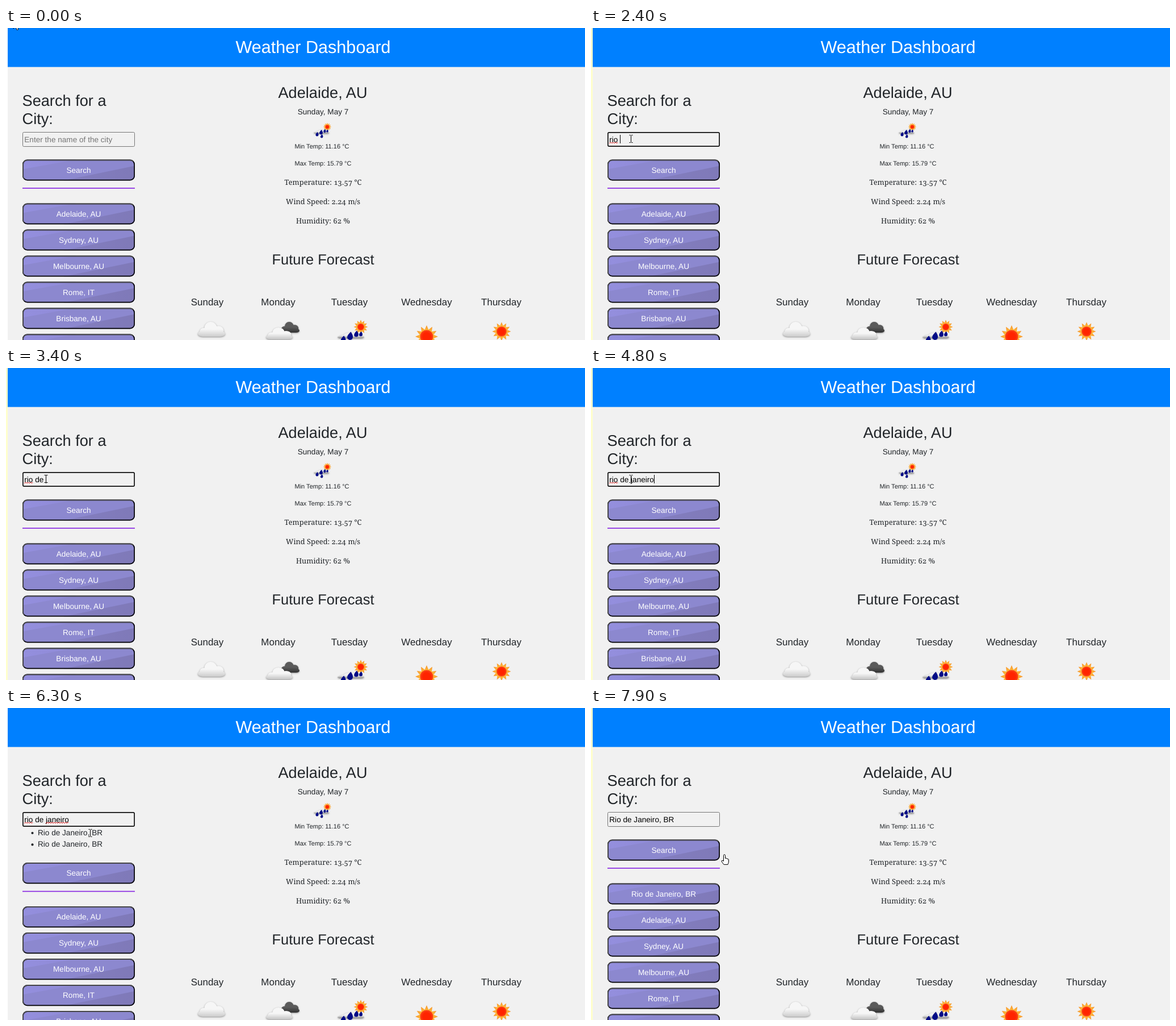
An HTML page with a canvas that plays this animation: 1020x549 px, repeating every 8000 ms.

```html
<!DOCTYPE html>
<html lang="en">
<head>
<meta charset="utf-8">
<title>Weather Dashboard</title>
<style>
  html, body { margin: 0; width: 100%; height: 100%; overflow: hidden; background: #f1f1f1; }
  canvas { position: absolute; left: 0; top: 0; }
  p {
    position: absolute; left: 408px; width: 301px; margin: 0; text-align: center; white-space: nowrap;
    font: 12.85px/20px "Noto Serif", serif; font-variant-numeric: oldstyle-nums; color: #212529;
    text-rendering: geometricPrecision;
  }
</style>
</head>
<body>
<canvas id="stage" width="1020" height="549"></canvas>
<p style="top:261px">Temperature: 13.57 °C</p>
<p style="top:295px">Wind Speed: 2.24 m/s</p>
<p style="top:329px">Humidity: 62 %</p>
<script>
const ctx = document.getElementById('stage').getContext('2d');
const LOOP = 8000, STEP = 100;
const INK = '#212529', BODY = 13.6, LINE = 20.4, BORDER = 1.7;
const CITIES = ['Adelaide, AU', 'Sydney, AU', 'Melbourne, AU', 'Rome, IT', 'Brisbane, AU', 'Perth, AU'];

// Each timeline holds [start time, value].
const TYPED = [
  [0, ''], [2000, 'r'], [2200, 'ri'], [2300, 'rio'], [2400, 'rio '],
  [3000, 'rio d'], [3200, 'rio de'], [3400, 'rio de '],
  [4100, 'rio de j'], [4200, 'rio de ja'], [4300, 'rio de jan'], [4400, 'rio de jane'],
  [4500, 'rio de janei'], [4700, 'rio de janeir'], [4800, 'rio de janeiro'],
  [6600, 'Rio de Janeiro, BR']
];
const HINTS = [
  [0, []], [2600, ['Rio, GR']], [3400, []],
  [5100, ['Rio de Janeiro, BR', 'Rio de Janeiro, BR']], [6600, []]
];
const CARET = [
  [0, 0], [1300, 1], [1800, 0], [2000, 1], [2900, 0], [3000, 1], [3900, 0],
  [4100, 1], [5400, 0], [5900, 1], [6300, 0]
];
const FOCUS = [[0, 0], [1300, 1], [6600, 0]];
const EDGE = [
  [0, '#fff'], [1300, '#ffffcc'], [3000, '#fff'], [3200, '#ffffcc'],
  [5600, '#fff'], [6600, '#ffffcc']
];
const MISSPELT = [[0, []], [2400, ['rio']], [5600, ['rio', 'janeiro']], [6600, []]];
const HISTORY = [[0, CITIES], [7500, ['Rio de Janeiro, BR', ...CITIES]]];

// Pointer path: time, x, y, shape
const PATH = [
  [0, 13, -15, 'arrow'], [100, 20, 10, 'arrow'], [300, 52, 130, 'arrow'],
  [500, 90, 242, 'hand'], [600, 90, 236, 'hand'], [700, 82, 222, 'arrow'],
  [800, 72, 196, 'beam'], [900, 70, 190, 'beam'], [1000, 70, 195, 'beam'],
  [5500, 70, 195, 'beam'], [5600, 84, 205, 'beam'], [5700, 130, 222, 'beam'],
  [5800, 182, 232, 'arrow'], [5900, 160, 226, 'beam'], [6000, 148, 225, 'beam'],
  [6100, 148, 225, 'beam'], [6200, 148, 222, 'beam'], [6300, 148, 220, 'beam'],
  [6700, 148, 220, 'arrow'], [6800, 148, 220, 'arrow'], [7200, 140, 236, 'hand'],
  [7700, 136, 245, 'hand'], [7800, 185, 252, 'hand'], [7900, 235, 258, 'hand']
];

const ARROW = new Path2D('M0 0V16L3.7 12.6L6.3 18.6L8.8 17.5L6.2 11.7H11.5Z');
const HAND = new Path2D('M-1.5 10V1.5A1.5 1.5 0 0 1 1.5 1.5V6.5L3 6.2Q4.5 6.3 4.5 7.5Q7.5 7 7.5 9V13L6 17.5H-1L-5 12Q-5 9.8 -3 10.3L-1.5 11.5Z');
const BEAM = new Path2D('M-2.5 -6.5H-.5L.5 -5.5L1.5 -6.5H3.5M.5 -5.5V5.5M-2.5 6.5H-.5L.5 5.5L1.5 6.5H3.5');

const last = (line, t) => line.filter(k => k[0] <= t).pop();
const at = (line, t) => last(line, t)[1];

function rect(x, y, w, h, fill) {
  ctx.fillStyle = fill;
  ctx.fillRect(x, y, w, h);
}

function setFont(size) {
  ctx.font = `${size}px "Liberation Sans", Arial, sans-serif`;
  ctx.textRendering = 'geometricPrecision';
}

function text(str, x, y, size, color = INK, align = 'center') {
  setFont(size);
  ctx.fillStyle = color;
  ctx.textAlign = align;
  ctx.fillText(str, x, y);
}

function textWidth(str) {
  setFont(BODY);
  return ctx.measureText(str).width;
}

function polygon(points) {
  ctx.beginPath();
  points.forEach(([x, y]) => ctx.lineTo(x, y));
  ctx.closePath();
}

function disc(x, y, r, fill) {
  ctx.fillStyle = fill;
  ctx.beginPath();
  ctx.arc(x, y, r, 0, 7);
  ctx.fill();
}

// Rounded outline kept inside its box
function outline(x, y, w, h, r, width, color) {
  ctx.lineWidth = width;
  ctx.strokeStyle = color;
  ctx.beginPath();
  ctx.roundRect(x + width / 2, y + width / 2, w - width, h - width, r - width / 2);
  ctx.stroke();
}

function gradient(x0, y0, x1, y1, ...colors) {
  const g = ctx.createLinearGradient(x0, y0, x1, y1);
  colors.forEach((c, i) => g.addColorStop(i / (colors.length - 1), c));
  return g;
}

function radial(x, y, r0, r1, inner, outer) {
  const g = ctx.createRadialGradient(x, y, r0, x, y, r1);
  g.addColorStop(0, inner);
  g.addColorStop(1, outer);
  return g;
}

function button(y, label) {
  const w = 198, h = 37;
  ctx.save();
  ctx.translate(29, y);
  ctx.save();
  ctx.beginPath();
  ctx.roundRect(0, 0, w, h, 8.5);
  ctx.clip();
  rect(0, 0, w, h, '#8c88cf');
  polygon([[0, 0], [95, 0], [0, 17]]);
  ctx.fillStyle = gradient(0, 0, 95, 0, '#948fde', '#8f8ad6');
  ctx.fill();
  polygon([[72, h], [w, 11], [w, h]]);
  ctx.fillStyle = gradient(72, 0, w, 0, '#847fc1', '#7f79b8');
  ctx.fill();
  ctx.restore();

  outline(0, 0, w, h, 8.5, BORDER, '#000');
  polygon([[0, 0], [w, 0], [w - 10, 10], [10, h - 10], [0, h]]);
  ctx.clip();
  outline(0, 0, w, h, 8.5, BORDER, '#4c4c4c');
  ctx.restore();
  text(label, 128, y + 23, BODY, '#fff');
}

function sun(x, y, r, core) {
  const points = [];
  for (let i = 0; i < 24; i++) {
    const a = i * Math.PI / 12, d = i % 2 ? r * 0.64 : r;
    points.push([x + d * Math.sin(a), y - d * Math.cos(a)]);
  }
  ctx.fillStyle = radial(x, y, core, r, '#ffb638', '#f5942f');
  polygon(points);
  ctx.fill();
  disc(x, y, core, radial(x, y, core * 0.6, core, '#ff2400', '#f9451a'));
}

function cloud(x, y, w, h, top, bottom) {
  ctx.save();
  ctx.translate(x, y);
  ctx.scale(w, h);
  ctx.shadowColor = 'rgba(0,0,0,.4)';
  ctx.shadowBlur = 3;
  ctx.shadowOffsetY = 1;
  ctx.fillStyle = gradient(0, 0, 0, 1, top, top, bottom);
  ctx.beginPath();
  ctx.roundRect(0, 0.62, 1, 0.38, { x: 0.18, y: 0.19 });
  for (const [cx, cy, rx, ry] of [[.22, .68, .16, .27], [.47, .42, .23, .42], [.75, .6, .2, .32]]) {
    ctx.moveTo(cx + rx, cy);
    ctx.ellipse(cx, cy, rx, ry, 0, 0, 7);
  }
  ctx.fill();
  ctx.restore();
}

function drop(x, y, r) {
  ctx.fillStyle = '#000c86';
  ctx.beginPath();
  ctx.moveTo(x + r * 0.3, y - r * 1.7);
  ctx.quadraticCurveTo(x + r * 1.2, y - r * 0.3, x + r, y + r * 0.2);
  ctx.arc(x, y + r * 0.2, r, 0, Math.PI);
  ctx.quadraticCurveTo(x - r * 0.9, y - r * 0.6, x + r * 0.3, y - r * 1.7);
  ctx.fill();
}

function showers(x, y, s) {
  ctx.save();
  ctx.translate(x, y);
  ctx.scale(s, s);
  sun(0, 0, 12.5, 6);
  cloud(-41, 10, 47, 10, '#f0f0f0', '#8a8a8a');
  drop(-31, 23, 4.4);
  drop(-19, 17, 5);
  drop(-17, 29, 4);
  drop(-8, 13, 3.8);
  drop(0, 13, 3);
  ctx.restore();
}

function forecast() {
  text('Adelaide, AU', 558, 123, 27.2);
  text('Sunday, May 7', 558.5, 152, BODY);
  showers(566, 174, 0.58);
  text('Min Temp: 11.16 °C', 556.5, 212.3, 11.05);
  text('Max Temp: 15.79 °C', 558.5, 242.3, 11.05);
  text('Future Forecast', 558.5, 416, 25.5);
  [['Sunday', 354.5], ['Monday', 479.5], ['Tuesday', 605], ['Wednesday', 741], ['Thursday', 872.5]]
    .forEach(([day, x]) => text(day, x, 488, 17));
  cloud(338, 517, 48, 26, '#f6f6f6', '#cccccc');
  cloud(483, 517, 34, 19, '#5a5a5a', '#333333');
  cloud(458, 527, 47, 21, '#f6f6f6', '#c4c4c4');
  showers(625, 526, 1);
  sun(741, 543, 20, 11.5);
  sun(873, 534, 16.5, 8.8);
}

function squiggle(x, w) {
  ctx.strokeStyle = '#ee2222';
  ctx.lineWidth = 1;
  ctx.beginPath();
  for (let i = 0; i <= w; i++) ctx.lineTo(x + i, 202 + Math.sin(i * Math.PI / 2));
  ctx.stroke();
}

function searchBox(t) {
  const typed = at(TYPED, t), focused = at(FOCUS, t);
  if (focused) outline(29, 183, 198, 26, 3, BORDER, '#101010');
  else outline(29, 183, 198, 26, 2.5, 1, '#767676');
  text(typed || 'Enter the name of the city', 32.3, 200.5, BODY, typed ? '#000' : '#757575', 'left');
  for (const word of at(MISSPELT, t)) {
    const before = typed.slice(0, typed.indexOf(word));
    squiggle(32.3 + textWidth(before), textWidth(word));
  }
  if (at(CARET, t)) rect(Math.round(32.3 + textWidth(typed)), 188, 1, 15, '#000');
}

function sidebar(t) {
  text('Search for a', 28.5, 137, 27.2, INK, 'left');
  text('City:', 28.5, 169, 27.2, INK, 'left');
  searchBox(t);
  const hints = at(HINTS, t);
  hints.forEach((hint, i) => {
    const y = 224 + i * LINE;
    disc(46.5, y - 4, 2.1, INK);
    text(hint, 56, y, BODY, INK, 'left');
  });
  const shift = hints.length * LINE;
  button(231.5 + shift, 'Search');
  rect(29, 281 + shift, 198, BORDER, '#8a2be2');
  at(HISTORY, t).forEach((city, i) => button(308.5 + shift + i * 46, city));
}

function pointer(t) {
  const a = last(PATH, t), b = PATH[PATH.indexOf(a) + 1] || a;
  const u = b === a ? 0 : (t - a[0]) / (b[0] - a[0]);
  ctx.save();
  ctx.translate(Math.round(a[1] + (b[1] - a[1]) * u), Math.round(a[2] + (b[2] - a[2]) * u));
  ctx.lineWidth = 1;
  ctx.strokeStyle = '#000';
  if (a[3] === 'beam') {
    ctx.stroke(BEAM);
  } else {
    const shape = a[3] === 'hand' ? HAND : ARROW;
    ctx.fillStyle = '#fff';
    ctx.fill(shape);
    ctx.stroke(shape);
  }
  ctx.restore();
}

function draw(t) {
  rect(0, 0, 1020, 549, '#f1f1f1');
  rect(3, 0, 1017, 68.6, '#0080ff');
  rect(0, 0, 3, 549, at(EDGE, t));
  text('Weather Dashboard', 541, 44, 30.6, '#fff');
  forecast();
  sidebar(t);
  pointer(t);
}

let shown = -1;
const start = performance.now();
function tick() {
  const t = Math.floor((performance.now() - start) % LOOP / STEP) * STEP;
  if (t !== shown) draw(shown = t);
  requestAnimationFrame(tick);
}
tick();
</script>
</body>
</html>
```
